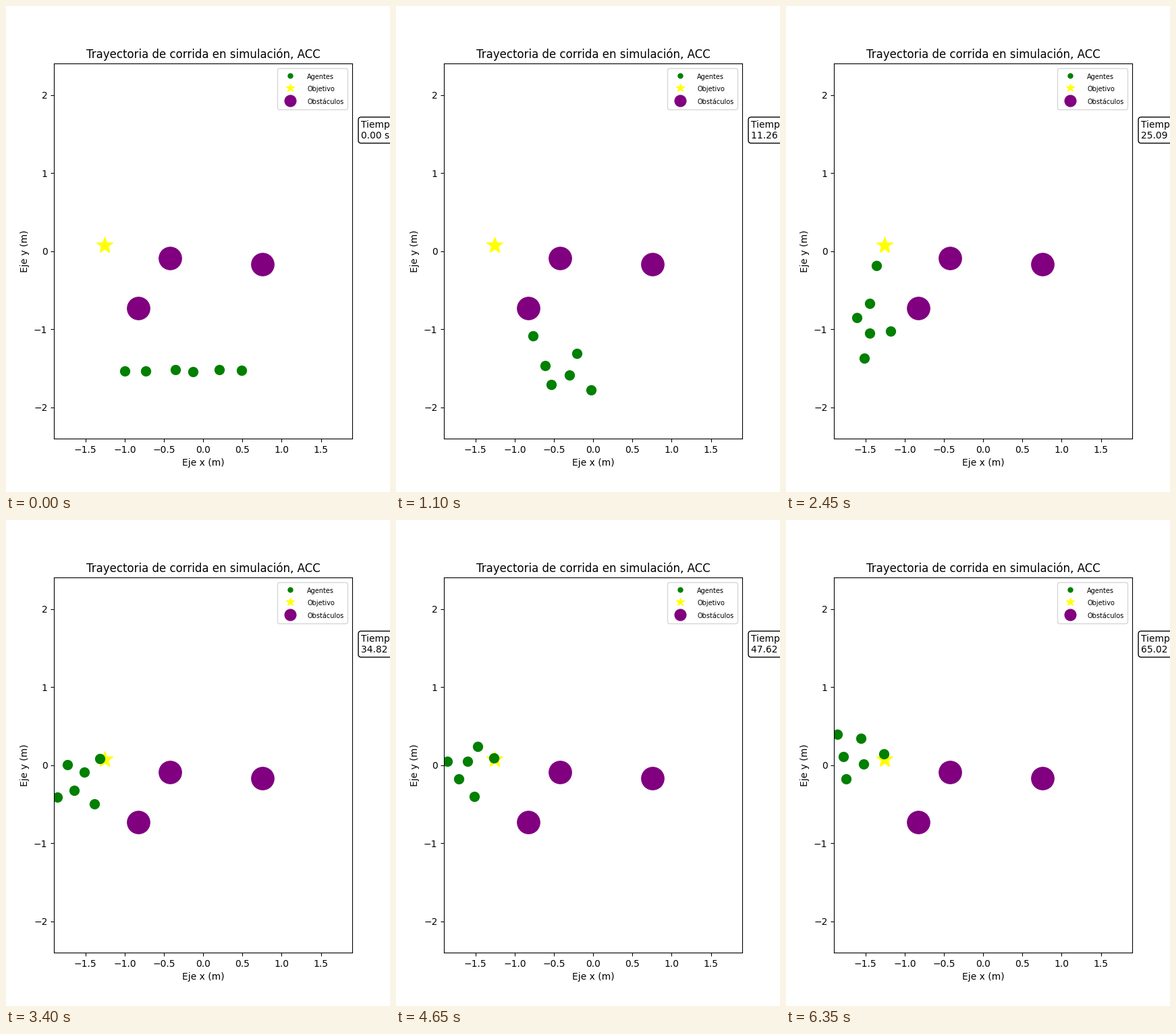
Animation, 569 px wide and 719 px high, one loop 6400 ms. Source, as a matplotlib script:

```python
import numpy as np
import matplotlib.pyplot as plt
from matplotlib.animation import FuncAnimation

W, H, DPI = 569, 719, 100
FRAMES, STEP_MS = 128, 50
SECONDS_PER_FRAME = 0.512
LEFT, BOTTOM, AX_W, AX_H = 71.25, 79.2, 441.75, 554.4
X_LIM, Y_LIM = 1.9, 2.4
WALL = 76  # agents cannot pass this pixel column

# Stage pixels at the shared key frames, one row per agent
KEYS = (0, 22, 38, 49, 68, 93, 127)
XS = [
    (176, 203, 151, 134, 139, 145, 145),
    (207, 221, 182, 124, 116, 106, 115),
    (251, 230, 163, 105, 91, 121, 111),
    (277, 257, 197, 124, 101, 93, 85),
    (316, 268, 229, 155, 131, 116, 89),
    (349, 289, 192, 116, 76, 76, 76),
]
YS = [
    (540, 488, 451, 384, 353, 352, 346),
    (540, 532, 488, 440, 373, 357, 361),
    (538, 560, 505, 461, 362, 335, 323),
    (541, 546, 516, 484, 400, 383, 350),
    (538, 514, 501, 481, 420, 409, 383),
    (539, 568, 547, 521, 410, 357, 317),
]
# Extra waypoints where an agent swerves: agent -> (frame, x, y)
SWERVES = {
    2: [(13, 233, 575)],
    4: [(78, 126, 423), (104, 109, 404)],
    5: [(26, 277, 572), (65, 77, 427)],
}


def agent_path(k):
    points = list(zip(KEYS, XS[k], YS[k])) + SWERVES.get(k, [])
    return np.array(sorted(points), float).T


PATHS = [agent_path(k) for k in range(len(XS))]


def smooth(t, keys, vals):
    """Cubic Hermite curve through uneven keys."""
    slopes = np.gradient(vals, keys)
    i = int(np.clip(np.searchsorted(keys, t, side="right") - 1, 0, len(keys) - 2))
    span = keys[i + 1] - keys[i]
    u = (t - keys[i]) / span
    return ((1 + 2 * u) * (1 - u) ** 2 * vals[i]
            + u * (1 - u) ** 2 * span * slopes[i]
            + u * u * (3 - 2 * u) * vals[i + 1]
            + u * u * (u - 1) * span * slopes[i + 1])


def to_data(px, py):
    x = (px - LEFT) / AX_W * 2 * X_LIM - X_LIM
    y = (H - py - BOTTOM) / AX_H * 2 * Y_LIM - Y_LIM
    return x, y


def agent_positions(t):
    spots = []
    for keys, xs, ys in PATHS:
        px = max(smooth(t, keys, xs), WALL)
        spots.append(to_data(px, smooth(t, keys, ys)))
    return zip(*spots)


fig = plt.figure(figsize=(W / DPI, H / DPI), dpi=DPI)
ax = fig.add_axes([LEFT / W, BOTTOM / H, AX_W / W, AX_H / H])
ax.set(xlim=(-X_LIM, X_LIM), ylim=(-Y_LIM, Y_LIM),
       xticks=np.arange(-1.5, 1.6, 0.5), yticks=range(-2, 3),
       xlabel="Eje x (m)", ylabel="Eje y (m)",
       title="Trayectoria de corrida en simulación, ACC")

agents, = ax.plot([], [], "o", color="green", ms=10, zorder=2.1, label="Agentes")
ax.plot([-1.255], [0.075], "*", color="yellow", ms=18, label="Objetivo")
ax.plot([-0.42, 0.757, -0.825], [-0.09, -0.17, -0.73], "o",
        color="purple", ms=24, label="Obstáculos")

legend = ax.legend(loc="upper right", markerscale=0.5)
plt.setp(legend.get_texts(), fontsize=7)

clock = ax.text(1.03, 0.85, "", transform=ax.transAxes, va="top",
                bbox=dict(boxstyle="round", facecolor="white"))


def update(i):
    agents.set_data(*agent_positions(i))
    clock.set_text(f"Tiempo:\n{i * SECONDS_PER_FRAME:.2f} s")
    return agents, clock


anim = FuncAnimation(fig, update, frames=FRAMES, interval=STEP_MS,
                     repeat=True, repeat_delay=0)
plt.show()
```
